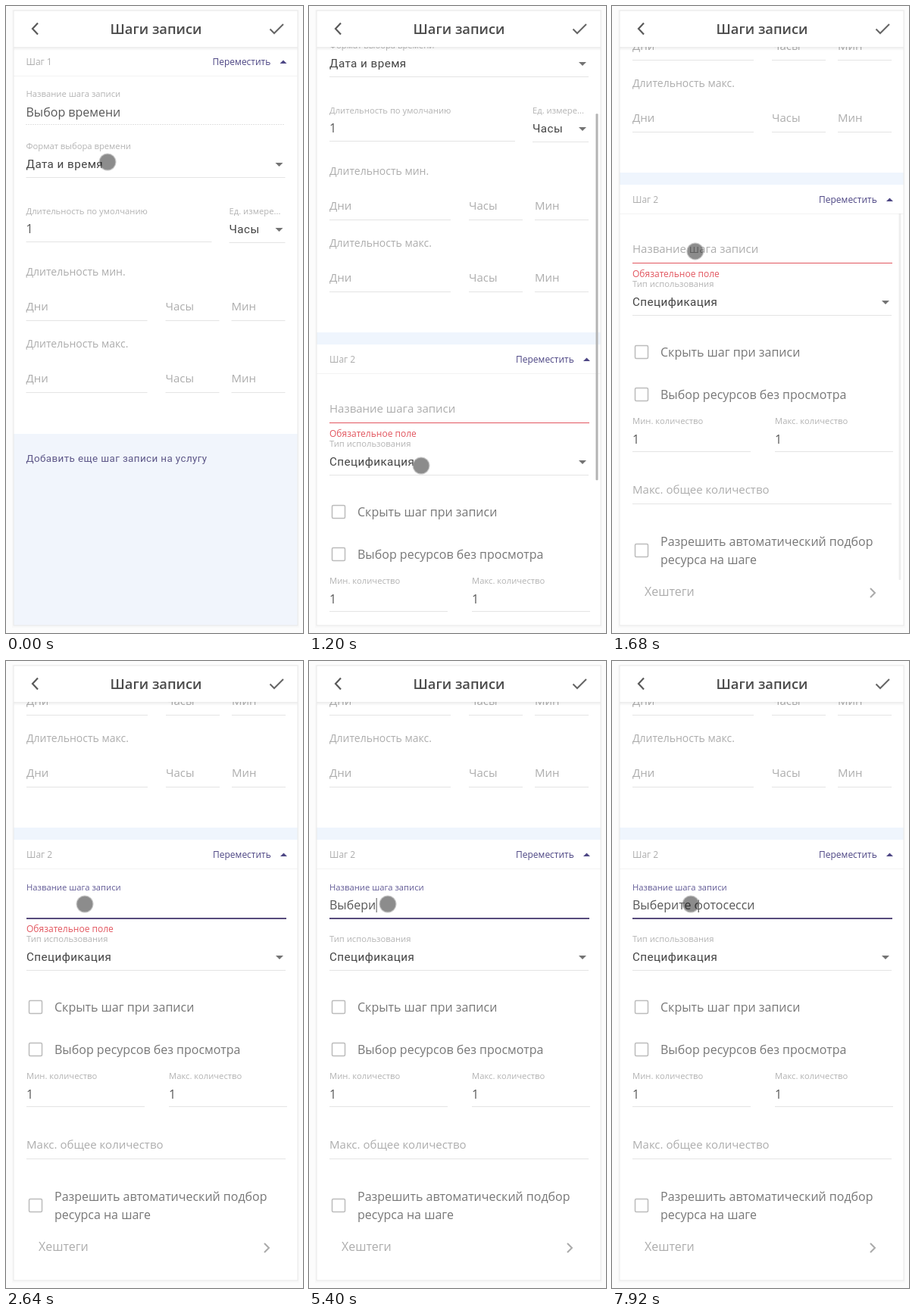
Animation of 392x828 px, one loop 8 s. Source, as an HTML page:

```html
<!DOCTYPE html>
<html lang="ru">
<head>
<meta charset="utf-8">
<title>Шаги записи</title>
<style>
html, body { margin: 0; width: 100%; height: 100%; overflow: hidden; background: #fcfcfc; }
svg { display: block; width: 392px; height: 828px; }
text { font-family: "Open Sans", "Noto Sans", sans-serif; white-space: pre; }
.roboto { font-family: Roboto, Arial, sans-serif; letter-spacing: .03em; }
</style>
</head>
<body>
<svg id="stage" viewBox="0 0 392 828">
  <defs>
    <clipPath id="view"><rect x="10" y="54" width="375" height="764"/></clipPath>
    <linearGradient id="shade" x1="0" y1="0" x2="0" y2="1">
      <stop offset="0" stop-color="#000" stop-opacity=".08"/>
      <stop offset="1" stop-color="#000" stop-opacity="0"/>
    </linearGradient>
  </defs>
  <rect width="392" height="828" fill="#fcfcfc"/>
  <rect x="8" y="5" width="379" height="816" fill="#f8f8f8"/>
  <rect x="10" y="6" width="375" height="812" fill="#fff"/>
  <g clip-path="url(#view)">
    <g id="content">
      <g id="first"></g>
      <g id="adder"></g>
      <g id="second"></g>
    </g>
  </g>
  <rect id="thumb" x="378.5" width="3" height="484" rx="1" fill="#b4b4b4"/>
  <g id="header"></g>
  <rect x="10" y="6" width="375" height="812" fill="none" stroke="#e8e8e8"/>
  <circle id="pointer" r="10.5" fill-opacity=".45" stroke="#999" stroke-opacity=".5" stroke-width="2"/>
</svg>
<script>
const LOOP = 8000, STEP = 120;
const SCROLL = 344;
const ADDED = 930, FOCUSED = 2040, LAST_CARET = 7920;
const INK = '#585858', DARK = '#444', HINT = '#adadad', LABEL = '#b3b3b3';
const NAVY = '#4d4684', RED = '#e2565f', RULE = '#e4e4e4';

const $ = id => document.getElementById(id);

function add(parent, tag, attrs, content) {
  const node = document.createElementNS('http://www.w3.org/2000/svg', tag);
  set(node, attrs);
  if (content !== undefined) node.textContent = content;
  return parent.appendChild(node);
}
function set(node, attrs) {
  for (const key in attrs) node.setAttribute(key, attrs[key]);
}
const text = (g, x, y, content, size, fill, extra = {}) =>
  add(g, 'text', { x, y, fill, 'font-size': size, ...extra }, content);
const label = (g, x, y, content) => text(g, x, y, content, 11.25, LABEL);
const rule = (g, x1, x2, y, stroke = RULE, width = 1) =>
  add(g, 'path', { d: `M${x1} ${y + .5}H${x2}`, stroke, 'stroke-width': width });
const stroke = (g, d, color, width) =>
  add(g, 'path', { d, fill: 'none', stroke: color, 'stroke-width': width });
const arrowDown = (g, y) => add(g, 'path', { d: `M356 ${y - 2}h10l-5 5z`, fill: '#737373' });
const choice = (g, x, y, value) => text(g, x, y, value, 15.2, DARK, { class: 'roboto' });

function stepHead(g, y, number) {
  text(g, 27, y, 'Шаг ' + number, 12, HINT);
  text(g, 273, y, 'Переместить', 12, NAVY);
  add(g, 'path', { d: `M362 ${y - 2}h9l-4.5 -4.5z`, fill: NAVY });
  rule(g, 10, 385, y + 14, '#f3f3f3');
}

function durationRow(g, y, name) {
  text(g, 27, y, name, 14, HINT);
  for (const [x1, x2, unit] of [[27, 187, 'Дни'], [211, 282, 'Часы'], [298, 369, 'Мин']]) {
    text(g, x1, y + 46, unit, 15, HINT);
    rule(g, x1, x2, y + 59);
  }
}

function selectField(g, y, name, value) {
  label(g, 27, y, name);
  choice(g, 27, y + 25, value);
  rule(g, 27, 369, y + 37);
  arrowDown(g, y + 20);
}

function checkbox(g, y, lines) {
  add(g, 'rect', { x: 30.5, y: y - 8.5, width: 17, height: 17, rx: 1.5,
    fill: 'none', stroke: '#bcbcbc', 'stroke-width': 1.5 });
  const top = y + 6 - (lines.length - 1) * 12;
  lines.forEach((line, i) => text(g, 64, top + i * 24, line, 16, '#777'));
}

function buildHeader(g) {
  add(g, 'rect', { x: 10, y: 6, width: 375, height: 48, fill: '#fff' });
  add(g, 'rect', { x: 10, y: 54, width: 375, height: 5, fill: 'url(#shade)' });
  stroke(g, 'M42 22.5L35 30L42 37.5', '#5a5a5a', 2.2);
  stroke(g, 'M348.5 30.5L354 36L366 24', '#666', 2);
  text(g, 198, 37, 'Шаги записи', 18.3, '#4a4a4a',
    { 'font-weight': 600, 'text-anchor': 'middle' });
}

function buildFirst(g) {
  stepHead(g, 78, 1);
  label(g, 27, 120, 'Название шага записи');
  text(g, 27, 146, 'Выбор времени', 16, INK);
  set(rule(g, 27, 369, 156, '#c4c4c4'), { 'stroke-dasharray': '1 2' });
  selectField(g, 189, 'Формат выбора времени', 'Дата и время');
  label(g, 27, 275, 'Длительность по умолчанию');
  text(g, 27, 300, '1', 16, INK);
  rule(g, 27, 272, 311);
  label(g, 295, 275, 'Ед. измере...');
  choice(g, 295, 300, 'Часы');
  rule(g, 295, 369, 312);
  arrowDown(g, 295);
  durationRow(g, 356, 'Длительность мин.');
  durationRow(g, 451, 'Длительность макс.');
}

function buildAdder(g) {
  add(g, 'rect', { x: 10, y: 565, width: 376, height: 254, fill: '#f1f5fc' });
  text(g, 27, 602, 'Добавить еще шаг записи на услугу', 13.4, '#5d5788', { class: 'roboto' });
}

// Laid out at its resting place on screen, then moved down by the scroll range.
function buildSecond(g) {
  set(g, { transform: `translate(0 ${SCROLL})` });
  add(g, 'rect', { x: 10, y: 220, width: 375, height: 16, fill: '#eff5fd' });
  stepHead(g, 260, 2);
  const field = {
    name: text(g, 27, 326, 'Название шага записи', 15, HINT),
    line: rule(g, 27, 370, 339),
    error: text(g, 27, 358, 'Обязательное поле', 12, RED),
    value: text(g, 27, 328, '', 16, INK),
    caret: add(g, 'rect', { y: 313, width: 1, height: 19, fill: '#555' })
  };
  selectField(g, 371, 'Тип использования', 'Спецификация');
  checkbox(g, 457, ['Скрыть шаг при записи']);
  checkbox(g, 513, ['Выбор ресурсов без просмотра']);
  for (const [x, name] of [[27, 'Мин. количество'], [215, 'Макс. количество']]) {
    label(g, x, 552, name);
    text(g, x, 578, '1', 16, INK);
    rule(g, x, x + 156, 588);
  }
  text(g, 27, 644, 'Макс. общее количество', 15, HINT);
  rule(g, 27, 369, 657);
  checkbox(g, 719, ['Разрешить автоматический подбор', 'ресурса на шаге']);
  text(g, 43, 779, 'Хештеги', 16, HINT);
  stroke(g, 'M341 769L347 775L341 781', '#aaa', 2);
  return field;
}

buildHeader($('header'));
buildFirst($('first'));
buildAdder($('adder'));
const field = buildSecond($('second'));

const pointerPath = [[120, 134, 206], [720, 146, 597], [1200, 148, 607],
  [1250, 148, 607], [1660, 110, 324], [1860, 104, 321]];

const typing = [[FOCUSED, ''], [3000, 'В'], [3480, 'Вы'], [3720, 'Выб'], [3960, 'Выбо'],
  [4200, 'Выбор'], [4680, 'Выбо'], [4800, 'Выб'], [4920, 'Выбе'], [5160, 'Выбер'],
  [5400, 'Выбери'], [5640, 'Выберит'], [5880, 'Выберите'], [6120, 'Выберите '],
  [6480, 'Выберите ф'], [6720, 'Выберите фо'], [6840, 'Выберите фот'],
  [7200, 'Выберите фото'], [7440, 'Выберите фотос'], [7800, 'Выберите фотосес'],
  [7920, 'Выберите фотосесси']];

const mix = (a, b, u) => a + (b - a) * u;
const progress = (t, from, to) => Math.min(1, Math.max(0, (t - from) / (to - from)));
const ease = u => u * u * (3 - 2 * u);
const show = (node, visible) => set(node, { visibility: visible ? 'visible' : 'hidden' });

function pointerAt(t) {
  const i = pointerPath.findIndex(point => point[0] > t);
  if (i === 0) return pointerPath[0].slice(1);
  if (i < 0) return pointerPath[pointerPath.length - 1].slice(1);
  const [t0, x0, y0] = pointerPath[i - 1], [t1, x1, y1] = pointerPath[i];
  const u = ease(progress(t, t0, t1));
  return [mix(x0, x1, u), mix(y0, y1, u)];
}

function drawField(t) {
  const focused = t >= FOCUSED;
  const float = ease(progress(t, FOCUSED, FOCUSED + 180));
  const [since, typed] = typing.filter(key => key[0] <= t).pop() || [0, ''];
  set(field.name, { y: mix(326, 303, float), 'font-size': mix(15, 11.25, float),
    fill: focused ? '#625b96' : HINT });
  set(field.line, { d: `M27 ${focused ? 340 : 339.5}H370`,
    stroke: focused ? '#574b7c' : RED, 'stroke-width': focused ? 2 : 1.2 });
  show(field.error, !typed);
  if (field.value.textContent !== typed) field.value.textContent = typed;
  const end = typed ? field.value.getComputedTextLength() : 0;
  set(field.caret, { x: 27.5 + end });
  show(field.caret, focused && t < LAST_CARET && (t - since) % 1000 < 500);
}

function draw(t) {
  const added = t >= ADDED;
  const offset = Math.round(SCROLL * ease(progress(t, 960, 1526)));
  set($('content'), { transform: `translate(${added ? 0 : -.5} ${-offset})` });
  set($('adder'), { display: added ? 'none' : 'inline' });
  set($('second'), { display: added ? 'inline' : 'none' });
  set($('thumb'), { y: 59 + offset * .625,
    opacity: t < 960 ? 0 : 1 - progress(t, 1540, 1720) });
  const [cx, cy] = pointerAt(t);
  set($('pointer'), { cx, cy });
  // Hidden parts inherit display from their group, so only a shown field needs work.
  if (added) drawField(t);
}

const stepped = t => Math.floor((t + 8) / STEP) * STEP;

const start = performance.now();
function tick() {
  draw(stepped((performance.now() - start) % LOOP));
  requestAnimationFrame(tick);
}
draw(0);
requestAnimationFrame(tick);
</script>
</body>
</html>
```
